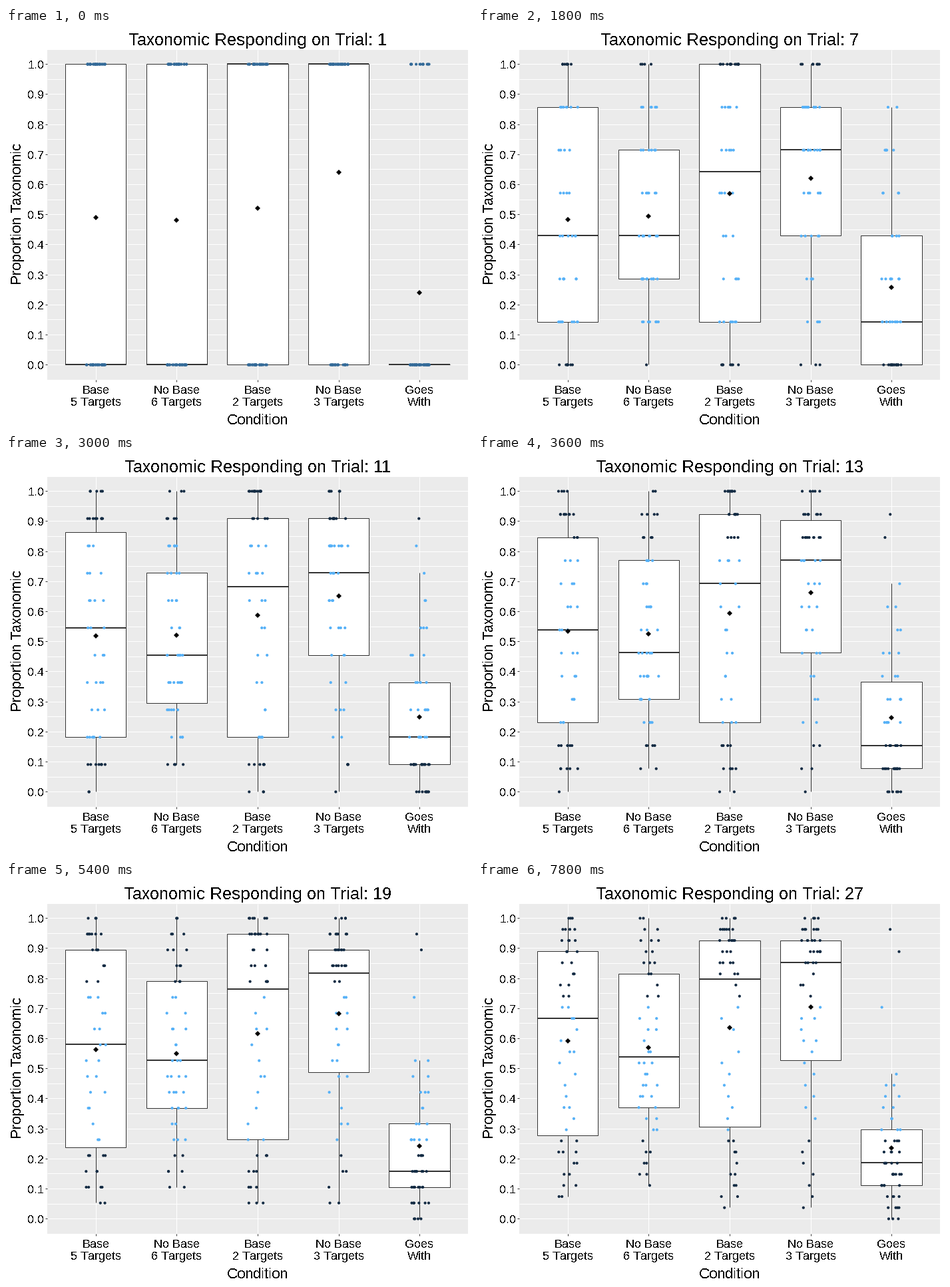
A matplotlib script that plays this animation: 700x600 px, repeating every 8 s.

```python
from math import comb, log

import matplotlib.pyplot as plt
import numpy as np
from matplotlib.animation import FuncAnimation
from matplotlib.patches import Rectangle

WIDTH, HEIGHT, DPI = 700, 600, 100
PX = 72 / DPI                      # one pixel in points
LEFT, RIGHT, TOP, BOTTOM = 61.9, 694, 33, 529
ZERO_Y, UNIT_Y = 506.1, 452
STEP_X = (RIGHT - LEFT) / 5.2
BOX_W, JITTER = 0.75 * STEP_X, 15
INK, DARK, LIGHT, MIDDLE = "#333333", "#132B43", "#56B1F7", "#336A98"
EARLY, LAST = 7, 27                # trials at which the spread is known

plt.rcParams.update({"font.family": "Liberation Sans",
                     "text.antialiased": False,
                     "text.hinting": "native",
                     "text.hinting_factor": 1})


class Group:
    """Simulated participants of one condition.

    early and late are five-number summaries of the taxonomic choices made
    after trials EARLY and LAST; start is the share choosing so on trial 1.
    """

    def __init__(self, label, start, early, late, size=50, strays=()):
        self.label, self.start, self.strays = label, start, np.array(strays)
        self.rank = np.linspace(0, 1, size)
        body = np.linspace(0, 1, size)[:size - len(strays)]
        knots = np.linspace(0, 1, 5)
        knots[-1] = body[-1]
        self.early = np.interp(body, knots, np.array(early) / EARLY)
        self.late = np.interp(body, knots, np.array(late) / LAST)

    def counts(self, n):
        if n == 1:
            return (self.rank >= 1 - self.start).astype(float)
        progress = max(0, log(n / EARLY) / log(LAST / EARLY))
        shares = self.early + (self.late - self.early) * progress
        body = np.floor(n * shares + 0.5 + 1e-9)
        return np.concatenate([body, np.floor(n * self.strays)])


GROUPS = [
    Group("Base\n5 Targets", 0.49, (0, 1, 3, 6, 7), (2, 7.5, 18, 24, 27), size=51),
    Group("No Base\n6 Targets", 0.48, (0.4, 2, 3, 5, 7), (3, 10, 14.5, 22, 27)),
    Group("Base\n2 Targets", 0.52, (0, 1, 4.5, 6.75, 7), (1, 8, 21.5, 25, 27)),
    Group("No Base\n3 Targets", 0.64, (0, 3, 5, 6, 7), (1, 14.25, 23, 25, 27)),
    Group("Goes\nWith", 0.24, (0, 0.4, 1, 2.75, 5), (0, 3, 5, 8, 13),
          strays=(0.97, 0.9, 0.74)),
]


def y_px(share):
    return ZERO_Y - UNIT_Y * np.asarray(share)


def dot_colour(count, n):
    """Dark where a two-sided binomial test rejects chance."""
    if n < 6:
        return MIDDLE
    tail = sum(comb(n, i) for i in range(int(min(count, n - count)) + 1))
    return DARK if 2 * tail / 2 ** n < 0.05 else LIGHT


fig = plt.figure(figsize=(WIDTH / DPI, HEIGHT / DPI), dpi=DPI, facecolor="white")
ax = fig.add_axes([0, 0, 1, 1])
ax.set(xlim=(0, WIDTH), ylim=(HEIGHT, 0))
ax.axis("off")


def line(xs, ys, colour, width, z):
    return ax.plot(xs, ys, color=colour, lw=width * PX, zorder=z,
                   solid_capstyle="butt")[0]


def label(x, y, text, size, **kwargs):
    style = dict(ha="center", va="baseline", color="black", zorder=9)
    return ax.text(x, y, text, fontsize=size * PX, **{**style, **kwargs})


ax.add_patch(Rectangle((LEFT, TOP), RIGHT - LEFT, BOTTOM - TOP,
                       fc="#EBEBEB", ec="none", zorder=0))
for i in range(21):
    y = y_px(i / 20)
    line([LEFT, RIGHT], [y, y], "white", 1, 1)
    if i % 2 == 0:
        line([LEFT - 3, LEFT], [y, y], INK, 1, 1)
        label(57.5, y + 7, f"{i / 20:.1f}", 18, ha="right")

centres = LEFT + STEP_X * (0.6 + np.arange(len(GROUPS)))
parts = []
for x, group in zip(centres, GROUPS):
    line([x, x], [TOP, BOTTOM], "white", 1, 1)
    line([x, x], [BOTTOM, BOTTOM + 3], INK, 1, 1)
    for row, text in enumerate(group.label.split("\n")):
        label(x, 549.5 + 19 * row, text, 18)
    box = ax.add_patch(Rectangle((x - BOX_W / 2, 0), BOX_W, 0, fc="white",
                                 ec=INK, lw=PX, zorder=3))
    whisker = line([x, x], [0, 0], INK, 1, 2)
    median = line([x - BOX_W / 2, x + BOX_W / 2], [0, 0], INK, 2, 4)
    parts.append((box, whisker, median))

label(378, 595.5, "Condition", 22)
label(23, 280, "Proportion Taxonomic", 22, rotation=90, rotation_mode="anchor")
title = label(378, 26, "", 26)
dots = ax.scatter([], [], s=(4.2 * PX) ** 2, linewidths=0, zorder=5)
means = ax.plot(centres, centres, "D", color="black", ms=6.2 * PX, mew=0,
                zorder=6)[0]


def update(frame):
    n = min(frame // 3 + 1, LAST)
    rng = np.random.default_rng(100 + n)
    title.set_text(f"Taxonomic Responding on Trial: {n}")
    points, colours, averages = [], [], []
    for x, group, (box, whisker, median) in zip(centres, GROUPS, parts):
        counts = group.counts(n)
        shares = counts / n
        q1, mid, q3 = np.quantile(shares, [0.25, 0.5, 0.75])
        reach = 1.5 * (q3 - q1) + 1e-9
        inside = shares[(shares >= q1 - reach) & (shares <= q3 + reach)]

        box.set_y(y_px(q3))
        box.set_height(UNIT_Y * (q3 - q1))
        whisker.set_ydata(y_px([inside.min(), inside.max()]))
        median.set_ydata(y_px([mid, mid]))
        averages.append(shares.mean())
        jitter = rng.uniform(-JITTER, JITTER, len(counts))
        points.append(np.column_stack([x + jitter, y_px(shares) + 0.4]))
        colours += [dot_colour(c, n) for c in counts]
    dots.set_offsets(np.vstack(points))
    dots.set_facecolor(colours)
    means.set_ydata(y_px(averages))
    return [title, dots, means]


anim = FuncAnimation(fig, update, frames=80, interval=100, repeat=True,
                     repeat_delay=0, blit=False)
plt.show()
```
